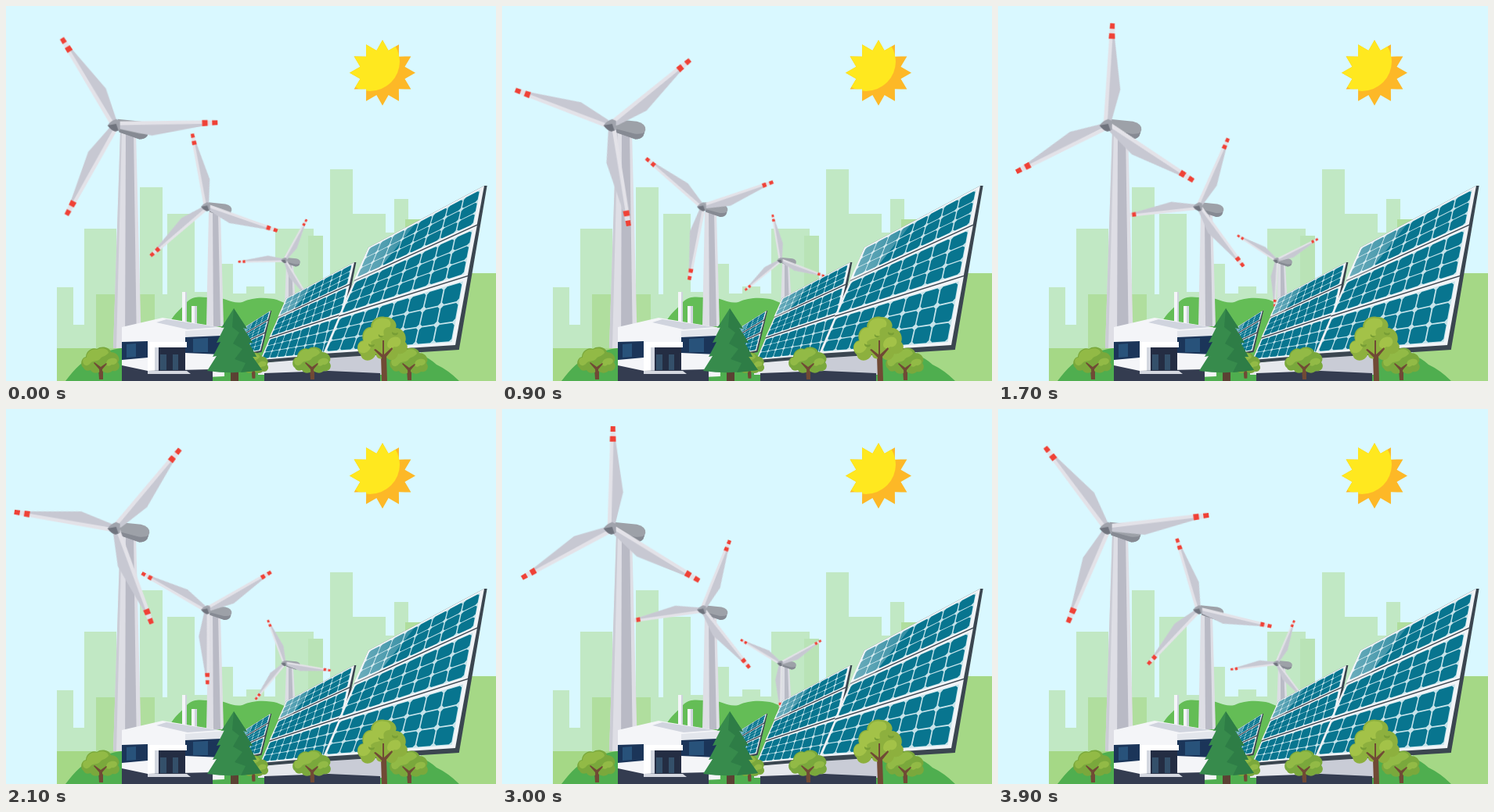
Recreate the animation shown at these times as an HTML page. Size 626 by 480 pixels, loop 4000 ms.

```html
<!DOCTYPE html>
<html lang="en">
<head>
<meta charset="utf-8">
<title>Wind and solar</title>
<style>
html, body { margin: 0; width: 100%; height: 100%; overflow: hidden; background: #d9f8ff; }
svg { display: block; width: 626px; height: 480px; }
.rotor { animation: spin 4s steps(40) infinite; }
@keyframes spin {
  from { transform: rotate(var(--a)); }
  to { transform: rotate(calc(var(--a) + 363.2deg)); }
}
</style>
</head>
<body>
<svg viewBox="0 0 626 480">
  <defs>
    <g id="blade">
      <path fill="#e3e2e8" d="M-3-132H3L4-112 13-47 4-4H-5z"/>
      <path fill="#c7c8d2" d="M1-112H4L14.500-47 5-6 0-4z"/>
      <path fill="#ef4136" d="M-3-132H3L3.300-125H-3.200zM-3.600-119H3.800L4.200-112H-3.800z"/>
    </g>
    <g id="blades">
      <use href="#blade"/>
      <use href="#blade" transform="rotate(120)"/>
      <use href="#blade" transform="rotate(240)"/>
    </g>
    <g id="nacelle">
      <path fill="#9da1a8" d="M3-8L33-5Q45-2 44 6L41 14Q38 18 31 18L5 9z"/>
      <path fill="#868a93" d="M4 4L30 11Q39 12 43 9L41 14Q38 18 31 18L5 9z"/>
    </g>
    <g id="nose">
      <path fill="#a0a3ac" d="M-10 0Q-6-6 1-8L6-6V6L0 8Q-6 6-10 0z"/>
      <path fill="#70747e" d="M-10 0L1-2 4 7 0 8Q-6 6-10 0z"/>
    </g>
    <g id="bush">
      <path fill="#704a35" d="M-2 22L-3 8-12-1-10-2-2 4V-8H1V5L10-2 12 0 3 9V22z"/>
      <path fill="#7aa83c" d="M-22 7C-27 4-25-6-19-7C-19-14-11-20-5-17C1-22 12-19 13-13C21-13 26-5 22 0C27 6 21 13 15 11C10 16 3 13 1 10C-4 16-11 14-13 10C-17 12-21 10-22 7z"/>
      <path fill="#92ba46" d="M-22 2C-24-3-22-6-18-6C-18-13-11-18-5-16C2-20 10-17 10-12C6-7 1-8-1-4C-6 0-9-3-13 1C-16 5-20 5-22 2zM7 2C7-5 16-7 20-4C23 0 18 4 14 3C11 6 7 5 7 2z"/>
      <path fill="#704a35" d="M-1 22L-2 9-9 1-8 0 0 6 7 1 8 2 2 9V22z"/>
    </g>
    <linearGradient id="glass" x1="0" y1="0" x2="1" y2="0">
      <stop offset="0" stop-color="#fff" stop-opacity=".42"/>
      <stop offset="1" stop-color="#fff" stop-opacity=".16"/>
    </linearGradient>
    <clipPath id="star"><path class="sun"/></clipPath>
  </defs>

  <rect width="626" height="480" fill="#d9f8ff"/>

  <!-- sun -->
  <path class="sun" fill="#fdb827"/>
  <circle cx="465" cy="71" r="38" fill="#ffe81f" clip-path="url(#star)"/>

  <!-- city -->
  <path fill="#c1e8c4" d="M65 480V360H86V408H100V285H141V369H171V232H200V369H206V266H241V366H258V330H290V368H307V359H330V368H344V285H393V294H405V350H414V209H443V266H485V290H496V247H514V275H560V480z"/>
  <path fill="#b0de9e" d="M115 438V369H190V438zM510 300V273H531V300z"/>
  <path fill="#b9e3b6" d="M386 400V294H405V400z"/>
  <path fill="#a5d886" d="M65 438H160V480H65zM530 480V342H626V480z"/>
  <path fill="#64bd56" d="M205 412C215 392 224 388 232 378C242 369 254 374 263 373C280 372 288 382 302 379C316 372 335 373 346 376L380 390V480H205z"/>
  <path fill="#4fae4f" d="M76 480C88 464 100 451 115 448C128 441 138 439 155 437V480zM250 480V462H345V480z"/>
  <path fill="#4fae4f" d="M470 480V445C510 440 530 441 550 459Q565 466 579 480z"/>

  <!-- turbines, far to near -->
  <path fill="#dcdde4" d="M358 330H367L370 385H356z"/>
  <path fill="#b9bbc6" d="M361 330H365L367 385H361z"/>
  <g transform="translate(356 325.500) scale(.45)">
    <use href="#nacelle"/>
    <g class="rotor" style="--a:28.200deg"><use href="#blades"/></g>
    <use href="#nose"/>
  </g>
  <path fill="#dedee5" d="M259 264H274L278 410H256z"/>
  <path fill="#b9bac5" d="M264 264H271L274 410H265z"/>
  <g transform="translate(256.500 257) scale(.722)">
    <use href="#nacelle"/>
    <g class="rotor" style="--a:108.800deg"><use href="#blades"/></g>
    <use href="#nose"/>
  </g>
  <path fill="#dedee5" d="M146 160H166L173 438H137z"/>
  <path fill="#b9bac5" d="M153 160H163L167 438H152z"/>
  <path fill="#cbccd5" d="M146 160H148L141 438H137z"/>
  <g transform="translate(139.700 152.700) scale(.99)">
    <use href="#nacelle"/>
    <g class="rotor" style="--a:88.500deg"><use href="#blades"/></g>
    <use href="#nose"/>
  </g>

  <!-- panel plinths -->
  <path fill="#e6e8ed" d="M322 458L415 445 480 447V472H322z"/>
  <path fill="#c9ccd6" d="M412 450L480 447V472H412z"/>
  <path fill="#343c50" d="M330 470L412 467 478 470V480H330z"/>
  <g id="panels"></g>

  <!-- station -->
  <path fill="#f4f5f8" d="M225 366H231V405H225zM237 384H244V408H237z"/>
  <path fill="#cfd3dc" d="M229 366H231V405H229zM241 384H244V408H241z"/>
  <path fill="#f4f5f8" d="M148 411L200 399 279 412V474L148 480z"/>
  <path fill="#d0d4de" d="M192 405L205 401 272 411 232 414z"/>
  <path fill="#e3e6ec" d="M229 416L279 412V424L229 428z"/>
  <path fill="#1b3559" d="M148 430L181 429V450L148 453zM229 424L275 422V446L229 444z"/>
  <path fill="#28527a" d="M154 433L166 432V449L154 450zM239 426L258 425V443H239z"/>
  <path fill="#242d43" d="M194 436H229V468H194z"/>
  <path fill="#34506a" d="M197 446H205V466H197zM213 446H220V466H213z"/>
  <path fill="#fff" d="M181 430H231V437H195V468H181z"/>
  <path fill="#d3d7e0" d="M190 437H195V468H190z"/>
  <path fill="#343c50" d="M148 460L181 467 264 465V480H148z"/>
  <path fill="#d5d8e0" d="M181 467H231L236 471H181z"/>

  <!-- trees -->
  <use href="#bush" transform="translate(316 459) scale(.800)"/>
  <path fill="#5b4133" d="M287 464H297V480H287z"/>
  <path fill="#378b4c" d="M291 387L308 413 303 412 315 431 310 431 320 449 315 449 327 466Q292 472 257 467L269 448 264 449 274 430 269 431 279 411 275 412z"/>
  <path fill="#2e7d46" d="M291 387L308 413 303 412 315 431 310 431 320 449 315 449 327 466 300 469 306 457 292 452 302 439 290 432 298 418 289 411z"/>
  <use href="#bush" transform="translate(121 456)"/>
  <use href="#bush" transform="translate(391 456)"/>
  <use href="#bush" transform="translate(515 457)"/>
  <g>
    <path fill="#704a35" d="M480 480L479 448 465 436 467 434 479 443V420H484V445L496 433 498 435 486 449 487 480z"/>
    <path fill="#8db03e" d="M453 446C446 440 449 429 456 428C453 418 460 410 466 411C466 401 476 396 484 398C493 397 501 405 498 412C507 412 513 422 510 430C517 437 510 447 501 445C498 456 487 455 485 447C480 455 472 451 473 445C468 457 455 456 453 446z"/>
    <path fill="#a3c248" d="M452 443C447 437 450 430 457 429C455 418 461 411 468 412C468 401 478 398 485 400C491 401 493 406 490 411C484 411 481 415 483 421C477 428 472 424 466 430C469 438 460 448 452 443zM487 434C487 426 495 422 501 424C508 428 503 438 496 436C492 440 487 438 487 434z"/>
    <path fill="#789e35" d="M476 420a3 3 0 0 0 6 2q-4 1-6-2zM493 417a4 4 0 0 0 8 1q-5 2-8-1zM463 432a4 4 0 0 0 8 1q-5 2-8-1z"/>
    <path fill="#704a35" d="M481 480L480 450 470 440 472 439 481 446V428H483V446L493 437 494 439 485 450 486 480z"/>
  </g>
</svg>
<script>
// Sun outline: twelve short spikes
const spikes = Array.from({ length: 24 }, (_, i) => {
  const a = i * Math.PI / 12, r = i % 2 ? 29.5 : 42;
  return `${481 + r * Math.sin(a)} ${85.5 - r * Math.cos(a)}`;
});
document.querySelectorAll('.sun').forEach(p => p.setAttribute('d', `M${spikes.join('L')}z`));

const mix = (p, q, t) => [p[0] + (q[0] - p[0]) * t, p[1] + (q[1] - p[1]) * t];
const poly = pts => `M${pts.map(p => p.map(n => n.toFixed(1)).join(' ')).join('L')}z`;
const fill = (d, color) => `<path d="${d}" fill="${color}"/>`;
const shift = ([x, y], dx, dy) => [x + dx, y + dy];

// Cuts between the three rows along the left and right edges
const leftCuts = [0, .32, .655, 1], rightCuts = [0, .25, .57, 1];

// One row of chamfered cells, columns widening towards the viewer
function row(tl, tr, br, bl, cols) {
  const at = (u, v) => {
    const s = u / (u + 1.25 * (1 - u));
    return mix(mix(tl, tr, s), mix(bl, br, s), v);
  };
  const box = (a, b, c, d) => poly([at(a, b), at(c, b), at(c, d), at(a, d)]);
  const w = .955 / cols, h = .9 / 3;
  let cells = '';
  for (let j = 0; j < 3; j++)
    for (let i = 0; i < cols; i++) {
      const cell = (x, y) => at(.02 + (i + x) * w, .05 + (j + y) * h);
      cells += poly([[.16, .04], [.84, .04], [.96, .16], [.96, .84], [.84, .96], [.16, .96], [.04, .84], [.04, .16]]
        .map(([x, y]) => cell(x, y)));
    }
  return fill(box(0, 0, 1, 1), '#f1f4f7') + fill(box(.02, .05, .975, .95), '#c5e3ea') + fill(cells, '#08758f');
}

// Corners: top left, top right, bottom right, bottom left
function panel(tl, tr, br, bl, cols, depth) {
  const left = leftCuts.map(t => mix(tl, bl, t)), right = rightCuts.map(t => mix(tr, br, t));
  let out = fill(poly([tl, tr, shift(tr, depth * .6, 0), shift(br, depth * .8, depth), shift(bl, 0, depth), bl]), '#3b4650');
  for (let i = 0; i < 3; i++) {
    const gap = i < 2 ? -1.5 : 0;
    out += row(left[i], right[i], shift(right[i + 1], 0, gap), shift(left[i + 1], 0, gap), cols);
  }
  const sheen = [tl, mix(tl, tr, .42), mix(left[1], right[1], .2), left[1]];
  return out + fill(poly(sheen), 'url(#glass)');
}

document.getElementById('panels').innerHTML =
  panel([302, 413], [338, 390], [325, 441], [290, 448], 5, 2) +
  panel([358, 374], [445, 328], [420, 445], [325, 453], 8, 4) +
  panel([463, 309], [611, 230], [574, 434], [405, 445], 8, 6);
</script>
</body>
</html>
```
